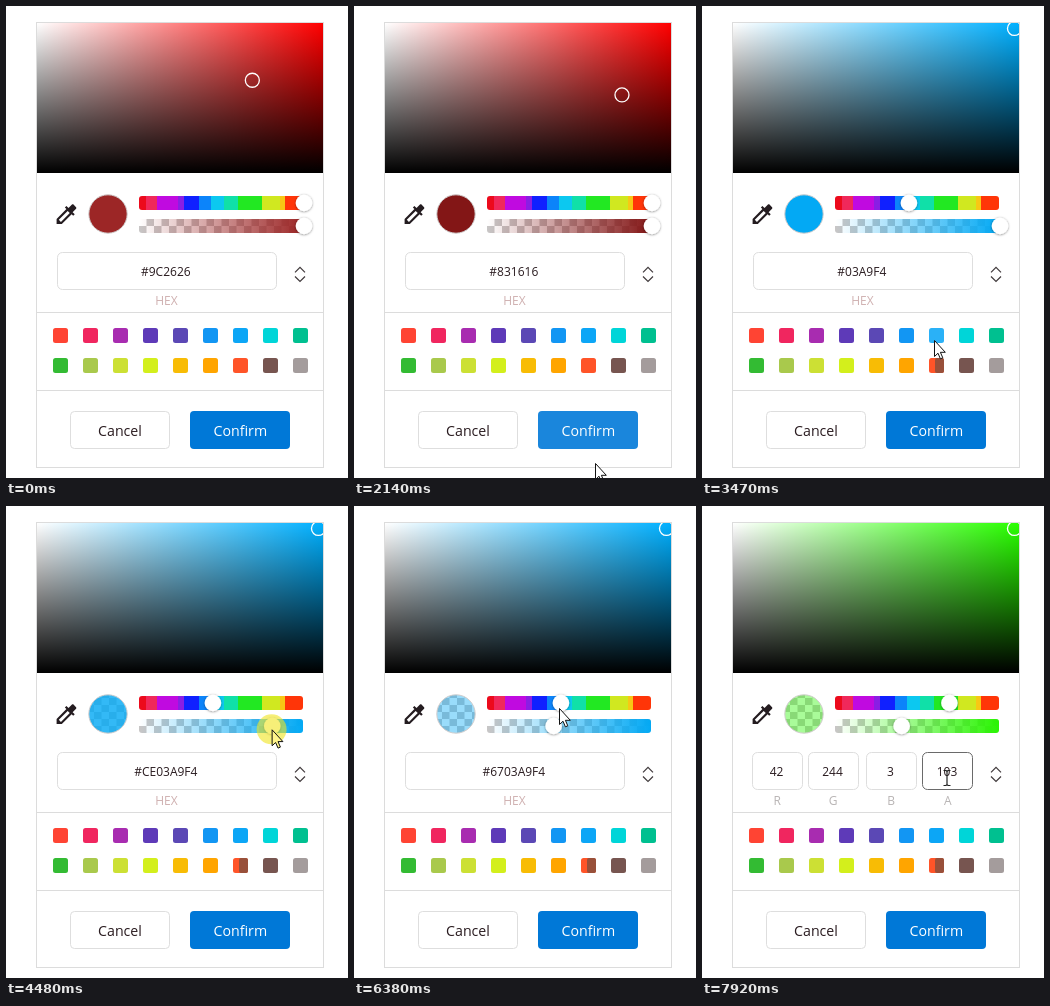
Recreate the animation shown at these times as an HTML page. Size 342 by 472 pixels, loop 7990 ms.

```html
<!DOCTYPE html>
<html lang="en">
<head>
<meta charset="utf-8">
<title>Color picker</title>
<style>
html, body { margin: 0; width: 100%; height: 100%; overflow: hidden; background: #fff; }
svg { display: block; width: 342px; height: 472px; }
text { font-family: "Open Sans", "Noto Sans", sans-serif; font-size: 12px; fill: #2a1c20; text-anchor: middle; }
.btn { font-size: 14.2px; }
.label { fill: #cfb0b0; }
.field { fill: #fff; stroke: #dedede; }
.field.hover { stroke: #6a6a6a; }
</style>
</head>
<body>
<svg id="stage" viewBox="0 0 342 472" xmlns="http://www.w3.org/2000/svg">
  <defs>
    <linearGradient id="white"><stop stop-color="#fff"/><stop offset="1" stop-color="#fff" stop-opacity="0"/></linearGradient>
    <linearGradient id="black" x2="0" y2="1"><stop stop-color="#000" stop-opacity="0"/><stop offset="1" stop-color="#000"/></linearGradient>
    <linearGradient id="hues" gradientUnits="userSpaceOnUse" x1="133" x2="297"></linearGradient>
    <linearGradient id="fade"><stop class="tint" stop-opacity="0"/><stop class="tint" offset="1"/></linearGradient>
    <pattern id="check" x="133" y="213" width="15" height="14" patternUnits="userSpaceOnUse">
      <rect width="15" height="14" fill="#fff"/>
      <path d="M7.5 0H15V7H7.5ZM0 7H7.5V14H0Z" fill="#c8c6c6"/>
    </pattern>
    <clipPath id="area"><rect x="31" y="17" width="286" height="150"/></clipPath>
    <filter id="soft" x="-40%" y="-40%" width="180%" height="180%">
      <feDropShadow dx="0" dy="0.5" stdDeviation="1.3" flood-opacity=".5"/>
    </filter>
  </defs>

  <rect x="30.5" y="16.5" width="287" height="445" fill="#fff" stroke="#dcdcdc"/>
  <g clip-path="url(#area)">
    <rect id="hueBox" x="31" y="17" width="286" height="150"/>
    <rect x="31" y="17" width="286" height="150" fill="url(#white)"/>
    <rect x="31" y="17" width="286" height="150" fill="url(#black)"/>
    <circle id="ring" r="7" fill="none" stroke="#fff" stroke-width="1.3"/>
  </g>

  <path transform="translate(47.3 195) scale(1.1)" fill="#241c20" d="M20.71 5.63l-2.34-2.34c-.39-.39-1.02-.39-1.41 0l-3.12 3.12-1.93-1.91-1.41 1.41 1.42 1.42L3 16.25V21h4.75l8.92-8.92 1.42 1.42 1.41-1.41-1.92-1.92 3.12-3.12c.4-.4.4-1.03.01-1.42zM6.92 19L5 17.08l8.06-8.06 1.92 1.92L6.92 19z"/>
  <circle cx="102" cy="208" r="19" fill="url(#check)"/>
  <circle id="preview" cx="102" cy="208" r="19.2" stroke="#d0cccc"/>

  <rect x="133" y="190" width="164" height="14" rx="3" fill="url(#hues)"/>
  <rect x="133" y="213" width="164" height="14" rx="3" fill="url(#check)"/>
  <rect x="133" y="213" width="164" height="14" rx="3" fill="url(#fade)"/>
  <circle id="hueThumb" cy="197" r="8.3" fill="#fff" filter="url(#soft)"/>
  <circle id="alphaThumb" cy="220" r="8.3" fill="#fff" filter="url(#soft)"/>

  <g id="hexForm"></g>
  <g id="rgbForm"></g>
  <path d="M289 266.3l5-5 5 5M289 270.5l5 5 5-5" fill="none" stroke="#403a3c" stroke-width="1.2"/>
  <path d="M31 306.5H317M31 384.5H317" stroke="#dcdcdc"/>
  <g id="swatches"></g>
  <rect id="trail" x="233" y="352" width="9" height="15" rx="2" fill="#98503a"/>

  <rect x="64.5" y="405.5" width="99" height="37" rx="4" fill="#fff" stroke="#dedede"/>
  <text class="btn" x="114" y="430">Cancel</text>
  <rect id="confirm" x="184" y="405" width="100" height="38" rx="4"/>
  <text class="btn" x="234.3" y="430" style="fill:#fff">Confirm</text>

  <circle id="press" r="15" fill="#f0e41e"/>
  <path id="arrow" d="M.5.5V16.5L4 13.2 6.4 18.8 8.8 17.8 6.4 12.3H11.3Z" stroke="#111"/>
  <path id="beam" d="M-3.5-7.5H-1L0-6.5 1-7.5H3.5M0-6.5V6.5M-3.5 7.5H-1L0 6.5 1 7.5H3.5" fill="none" stroke="#222" stroke-width="1.2"/>
</svg>
<script>
const LOOP = 7990, PICK = 3260, SWITCH = 7300;
const $ = id => document.getElementById(id);
const set = (el, attrs) => { for (const k in attrs) el.setAttribute(k, attrs[k]); };
const add = (parent, tag, attrs, text = '') => {
  const el = document.createElementNS('http://www.w3.org/2000/svg', tag);
  set(el, attrs);
  el.textContent = text;
  return parent.appendChild(el);
};

const CLOCK = [0, 100, 940, 1790, 2630, 3470, 3730, 4560, 5380, 6380, 7230];
const step = t => {
  const from = CLOCK.filter(c => c <= t).pop();
  return from + Math.floor((t - from) / 70) * 70;
};

// Monotone cubic through [time, ...values] keys.
function track(keys, t) {
  const last = keys.length - 1;
  if (t <= keys[0][0]) return keys[0].slice(1);
  if (t >= keys[last][0]) return keys[last].slice(1);
  const i = keys.findIndex(k => k[0] > t) - 1;
  const [a, b] = [keys[i], keys[i + 1]];
  const span = b[0] - a[0], u = (t - a[0]) / span;
  const slope = (n, c) => (keys[n + 1][c] - keys[n][c]) / (keys[n + 1][0] - keys[n][0]);
  const tangent = (n, c) => {
    if (n === 0 || n === last) return 0;
    const p = slope(n - 1, c), q = slope(n, c);
    return p * q <= 0 ? 0 : 2 * p * q / (p + q);
  };
  return a.slice(1).map((v, j) => {
    const c = j + 1, w = 1 - u;
    return v * (1 + 2 * u) * w * w + b[c] * u * u * (3 - 2 * u)
      + span * (tangent(i, c) * u * w * w - tangent(i + 1, c) * u * u * w);
  });
}

const POINTER = [
  [100, 317, 420], [800, 246, 77], [1080, 195, 60], [1290, 224, 49], [1560, 277, 80], [1720, 269, 91],
  [1860, 268, 104], [2070, 243, 422], [2140, 241, 457], [2300, 240, 490], [2420, 238, 480],
  [2560, 235, 360], [3000, 232, 334], [3730, 232, 334], [3950, 256, 257], [4150, 298, 222],
  [4220, 298, 222], [4520, 246, 224], [4900, 166, 226], [5270, 238, 226], [5450, 207, 225],
  [5700, 194, 224], [5900, 199, 222], [6080, 205, 202], [6380, 205, 202], [6660, 238, 199],
  [6800, 249, 199], [6870, 250, 201], [7160, 294, 267], [7330, 294, 267], [7700, 245, 272]
];
const SHADE = [
  [800, 118 / 156, 156 / 255], [1080, .57, .7], [1290, 131 / 199, 199 / 255],
  [1560, .86, .58], [1720, 109 / 131, 131 / 255]
];
const HUE = [[6380, 198.67], [6660, 131.2], [6800, 110.29]];
const ALPHA = [
  [4220, 1], [4520, .69], [4900, .2], [5270, .64], [5450, 126 / 255], [5700, .37], [5900, 103 / 255]
];
const PRESSES = [[800, 1760, .6], [3130, 3340, .6], [4220, 5960, .6], [6400, 6830, .42]];

function colorAt(t) {
  if (t < PICK) {
    const [s, v] = track(SHADE, t);
    return { h: 0, s, v, a: 1 };
  }
  return { h: track(HUE, t)[0], s: 241 / 244, v: 244 / 255, a: track(ALPHA, t)[0] };
}

function toRgb(h, s, v) {
  return [5, 3, 1].map(n => {
    const k = (n + h / 60) % 6;
    return Math.round(255 * v * (1 - s * Math.max(0, Math.min(k, 4 - k, 1))));
  });
}
const hex = n => Math.round(n).toString(16).toUpperCase().padStart(2, '0');
const inside = ([x, y], [l, t, w, h]) => x >= l && x <= l + w && y >= t && y <= t + h;

// Hue strip: hard-edged bands.
const BANDS = [
  [133, '#ec0a1c'], [140, '#f0285a'], [151, '#c00ae0'], [172, '#8a1ee4'], [178, '#1020ff'],
  [193, '#0c84fa'], [205, '#0cc8f0'], [218, '#10e0a8'], [232, '#22e822'], [256, '#d0e820'],
  [274, '#f8c814'], [279, '#ff3508']
];
BANDS.forEach(([x, color], i) => {
  const end = i + 1 < BANDS.length ? BANDS[i + 1][0] : 297;
  for (const p of [x, end]) add($('hues'), 'stop', { offset: (p - 133) / 164, 'stop-color': color });
});

const SWATCHES = ['#ff4433', '#f0265f', '#a82cb0', '#5e3ab8', '#5b48b5', '#1296f3', '#0ca6f6', '#00d5d8', '#00c090',
  '#33bb33', '#a9c94c', '#cce034', '#d3ef1c', '#f8bc05', '#ffa500', '#ff5428', '#775550', '#a49c9c'];
const chips = SWATCHES.map((fill, i) => {
  const box = [47 + i % 9 * 30, i < 9 ? 322 : 352, 15, 15];
  return { box, el: add($('swatches'), 'rect', { x: box[0], y: box[1], width: 15, height: 15, rx: 2.5, fill }) };
});

function field(form, x, width, center, name, color) {
  return {
    box: [x, 246, width, 38],
    el: add(form, 'rect', { class: 'field', x: x + .5, y: 246.5, width: width - 1, height: 37, rx: 5 }),
    value: add(form, 'text', { x: center, y: 270 }),
    label: add(form, 'text', { class: 'label', x: center + .7, y: 299, style: 'fill:' + color }, name)
  };
}
const hexField = field($('hexForm'), 51, 220, 159.8, 'HEX', '#cfb0b0');
const rgbFields = [[50, 74.5, 'R'], [106, 130.5, 'G'], [164, 188.5, 'B'], [220, 245, 'A']]
  .map(([x, center, name]) => field($('rgbForm'), x, 51, center, name, '#b8b4b4'));
const tints = document.querySelectorAll('.tint');

function draw(time) {
  const t = step(time);
  const { h, s, v, a } = colorAt(t);
  const rgb = toRgb(h, s, v), css = `rgb(${rgb})`;
  const pos = track(POINTER, t), past = track(POINTER, t - 70);
  const [x, y] = pos, shown = t >= 100;

  set($('hueBox'), { fill: `rgb(${toRgb(h, 1, 1)})` });
  set($('ring'), { cx: 30 + s * 286, cy: 16 + (1 - v) * 150 });
  set($('preview'), { fill: css, 'fill-opacity': a });
  tints.forEach(stop => set(stop, { 'stop-color': css }));
  set($('hueThumb'), { cx: 298 - h / 360 * 165 });
  set($('alphaThumb'), { cx: 133 + a * 165 });

  const split = t >= SWITCH;
  set($('hexForm'), { visibility: split ? 'hidden' : 'visible' });
  set($('rgbForm'), { visibility: split ? 'visible' : 'hidden' });
  hexField.value.textContent = '#' + (a < 1 ? hex(a * 255) : '') + rgb.map(hex).join('');
  [...rgb, Math.round(a * 255)].forEach((n, i) => { rgbFields[i].value.textContent = n; });

  // Hover states trail the pointer by one step.
  const fields = split ? rgbFields : [hexField];
  fields.forEach(f => set(f.el, { class: shown && inside(past, f.box) ? 'field hover' : 'field' }));
  chips.forEach(c => set(c.el, { opacity: shown && inside(past, c.box) ? .88 : 1 }));
  set($('confirm'), { fill: shown && inside(past, [184, 405, 100, 38]) ? '#1a86dc' : '#0078d7' });
  set($('trail'), { opacity: t > 2650 ? 1 : 0 });

  const press = PRESSES.find(([from, to]) => t >= from && t < to);
  const typing = fields.some(f => inside(pos, f.box));
  set($('press'), { cx: x, cy: y, opacity: press ? press[2] : 0 });
  set($('arrow'), {
    transform: `translate(${x} ${y})`, fill: press ? '#fff48a' : '#fff', opacity: shown && !typing ? 1 : 0
  });
  set($('beam'), { transform: `translate(${x} ${y})`, opacity: shown && typing ? 1 : 0 });
}

function tick() {
  draw(performance.now() % LOOP);
  requestAnimationFrame(tick);
}
tick();
</script>
</body>
</html>
```
